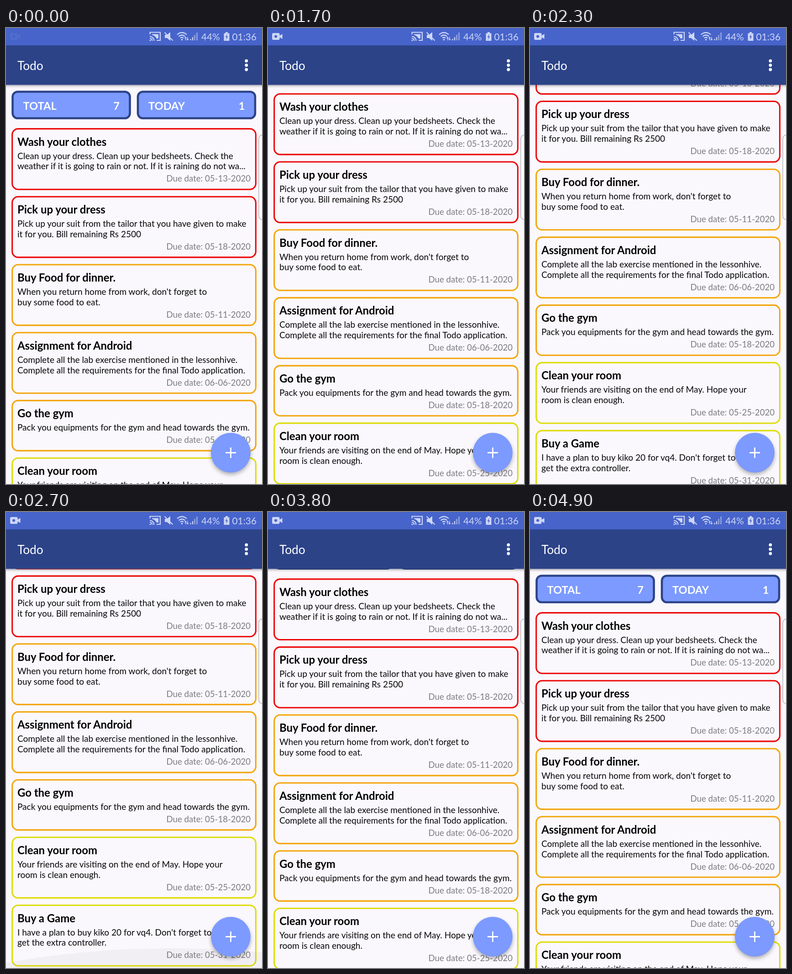
An HTML page for the animation above (5 s loop, 561 by 998 pixels).

```html
<!DOCTYPE html>
<html lang="en">
<head>
<meta charset="utf-8">
<title>Todo</title>
<style>
  html, body { margin: 0; width: 100%; height: 100%; overflow: hidden; background: #faf8fd; }
  svg { display: block; width: 100vw; height: 100vh; }
  text { font-family: Lato, "Open Sans", sans-serif; white-space: pre; }
  .title { font-size: 23.9px; font-weight: 700; fill: #000; }
  .body { font-size: 19.05px; fill: #060606; }
  .due { font-size: 18.6px; fill: #7c7c80; text-anchor: end; }
  .stat { font-size: 23.6px; font-weight: 700; fill: #fff; }
  .end { text-anchor: end; }
  .status { font-size: 20.8px; fill: #cdd6f6; }
</style>
</head>
<body>
<svg viewBox="0 0 561 998" preserveAspectRatio="none">
  <defs>
    <linearGradient id="shade" x2="0" y2="1">
      <stop offset="0" stop-color="#000" stop-opacity=".32"/>
      <stop offset=".4" stop-color="#000" stop-opacity=".12"/>
      <stop offset="1" stop-color="#000" stop-opacity="0"/>
    </linearGradient>
    <filter id="soft" x="-30%" y="-30%" width="160%" height="160%"><feGaussianBlur stdDeviation="5"/></filter>
    <clipPath id="view"><rect y="124" width="561" height="874"/></clipPath>
  </defs>

  <rect width="561" height="998" fill="#faf8fd"/>
  <g clip-path="url(#view)">
    <g id="list"></g>
    <ellipse id="topGlow" cx="280" rx="841" fill="#555"/>
    <ellipse id="endGlow" cx="365" rx="841" fill="#555"/>
  </g>

  <rect x="554" y="234" width="24" height="185.5" rx="8" fill="#fdfdfe" stroke="#a5a5aa" stroke-width="1.2"/>

  <circle cx="492.5" cy="934" r="43" opacity=".32" filter="url(#soft)"/>
  <circle cx="492.5" cy="929.5" r="43.5" fill="#7c9aff"/>
  <path d="M481 929.5h23M492.5 918v23" stroke="#fff" stroke-width="2.8"/>

  <rect y="124.5" width="561" height="7" fill="url(#shade)"/>
  <rect y="37" width="561" height="87.5" fill="#2c4388"/>
  <rect width="561" height="38" fill="#4764cb"/>
  <text x="25" y="92" font-size="26.2" fill="#fff">Todo</text>
  <g fill="#fff">
    <circle cx="526.8" cy="72" r="3.4"/><circle cx="526.8" cy="81.5" r="3.4"/><circle cx="526.8" cy="91" r="3.4"/>
  </g>

  <g id="rec" fill="#cdd6f6">
    <rect x="9" y="11" width="16.5" height="15" rx="3"/>
    <path d="M25 17l6.5-4v11l-6.5-4z"/>
    <circle cx="17" cy="18.5" r="3" fill="#4764cb"/>
  </g>
  <g fill="none" stroke="#cdd6f6" stroke-width="2.2">
    <path d="M315.5 14v-4.5h22.5v17.5h-8M315 18.500a9.5 9.5 0 0 1 9.5 9.5M315 22.500a5.5 5.5 0 0 1 5.5 5.5"/>
    <path d="M320 13.500h14v9.5h-4q-3-6-10-8z" fill="#cdd6f6" stroke="none"/>
    <circle cx="316" cy="27" r="1.6" fill="#cdd6f6" stroke="none"/>
    <path d="M348 15h5l7-6v19l-7-6h-5z" fill="#cdd6f6" stroke="none"/>
    <path d="M347.5 9.5l18 18"/>
    <path d="M375 14.500q10.5-9 21 0M378.5 18.500q7-6 14 0M382 22q3.5-3 7 0"/>
    <circle cx="385.5" cy="25.5" r="1.8" fill="#cdd6f6" stroke="none"/>
    <path d="M393.5 27v-7m-2 2.500l2-2.5 2 2.5M397.8 19.500v7m-2-2.500l2 2.5 2-2.5" stroke-width="1.3"/>
    <path d="M404.5 27v-3M409 27v-7"/>
    <path d="M413.5 27v-12M418.5 27v-17" stroke-width="3" opacity=".5"/>
  </g>
  <path d="M477.500 11.500h3.5v-2.500h5v2.500h3.5v16.500h-12z" fill="#cdd6f6"/>
  <path d="M485 13l-4.5 7h3l-1.5 6 4.5-7.500h-3z" fill="#4764cb"/>
  <text class="status" x="428" y="26.5">44%</text>
  <text class="status end" x="549" y="26.5">01:36</text>
</svg>
<script>
const $ = id => document.getElementById(id);
const LOOP = 5000, RED = "#ec0a0a", ORANGE = "#f4a60c", YELLOW = "#dddd0a";

const tasks = [
  [RED, "Wash your clothes", "05-13-2020",
    "Clean up your dress. Clean up your bedsheets. Check the",
    "weather if it is going to rain or not. If it is raining do not wa..."],
  [RED, "Pick up your dress", "05-18-2020",
    "Pick up your suit from the tailor that you have given to make",
    "it for you. Bill remaining Rs 2500"],
  [ORANGE, "Buy Food for dinner.", "05-11-2020",
    "When you return home from work, don't forget to",
    "buy some food to eat."],
  [ORANGE, "Assignment for Android", "06-06-2020",
    "Complete all the lab exercise mentioned in the lessonhive.",
    "Complete all the requirements for the final Todo application."],
  [ORANGE, "Go the gym", "05-18-2020",
    "Pack you equipments for the gym and head towards the gym."],
  [YELLOW, "Clean your room", "05-25-2020",
    "Your friends are visiting on the end of May. Hope your",
    "room is clean enough."],
  [YELLOW, "Buy a Game", "05-31-2020",
    "I have a plan to buy kiko 20 for vq4. Don't forget to",
    "get the extra controller."]
];

const label = (cls, x, y, str) => `<text class="${cls}" x="${x}" y="${y}">${str}</text>`;

const stat = (x, name, count) =>
  `<rect x="${x + 2.5}" y="139.5" width="257" height="58" rx="11" fill="#7c9aff" stroke="#2c4388" stroke-width="4.6"/>` +
  label("stat", x + 25.5, 179, name) + label("stat end", x + 237, 179, count);

function card(y, [color, title, due, ...lines]) {
  const extra = (lines.length - 1) * 22.9;
  return `<rect x="13.6" y="${y + 1.6}" width="533.8" height="${109.7 + extra}" rx="13" fill="#faf8fd" stroke="${color}" stroke-width="3.1"/>` +
    label("title", 25, y + 38.5, title) +
    lines.map((line, i) => label("body", 25, y + 67.5 + i * 22.9, line)).join("") +
    label("due", 536, y + 94.5 + extra, "Due date: " + due);
}

let cardTop = 219;
$("list").innerHTML = stat(12, "TOTAL", 7) + stat(286.5, "TODAY", 1) + tasks.map(task => {
  const out = card(cardTop, task);
  cardTop += task.length > 4 ? 148.7 : 125.8;
  return out;
}).join("");

// Monotone cubic through [time, value] keys
function curve(keys) {
  const slope = i => (keys[i + 1][1] - keys[i][1]) / (keys[i + 1][0] - keys[i][0]);
  const tangent = i => {
    if (i === 0 || i === keys.length - 1) return 0;
    const a = slope(i - 1), b = slope(i);
    return a * b > 0 ? 2 * a * b / (a + b) : 0;
  };
  return t => {
    if (t <= keys[0][0]) return keys[0][1];
    const i = keys.findIndex(k => k[0] > t) - 1;
    if (i < 0) return keys[keys.length - 1][1];
    const [t0, v0] = keys[i], [t1, v1] = keys[i + 1];
    const d = t1 - t0, u = (t - t0) / d, w = 1 - u;
    return v0 * (1 + 2 * u) * w * w + v1 * u * u * (3 - 2 * u)
      + d * u * w * (tangent(i) * w - tangent(i + 1) * u);
  };
}

const scroll = curve([[1400, 0], [1500, 10], [1700, 76.3], [2000, 173.6], [2250, 205], [2700, 229.2],
  [3300, 229.2], [3400, 219], [3800, 73.7], [4100, 22], [4400, 0]]);
const endPull = curve([[2500, 0], [2700, 0.385], [3100, 0]]);
const topPull = curve([[4200, 0], [4500, 0.62], [4900, 0]]);
const recFade = curve([[0, 0.07], [200, 1]]);

// Overscroll arc: a wide circle squashed against one edge
function glow(el, edge, dir, pull) {
  el.setAttribute("cy", edge + dir * 729 * pull);
  el.setAttribute("ry", 841 * pull);
  el.setAttribute("opacity", Math.min(0.05, pull * 0.13));
}

function draw(t) {
  $("list").setAttribute("transform", `translate(0 ${-scroll(t)})`);
  glow($("topGlow"), 124, -1, topPull(t));
  glow($("endGlow"), 998, 1, endPull(t));
  $("rec").setAttribute("opacity", recFade(t));
}

// The picture advances in steps of 100 ms
function tick() {
  draw(Math.floor(performance.now() / 100 + 0.05) * 100 % LOOP);
  requestAnimationFrame(tick);
}
tick();
</script>
</body>
</html>
```
